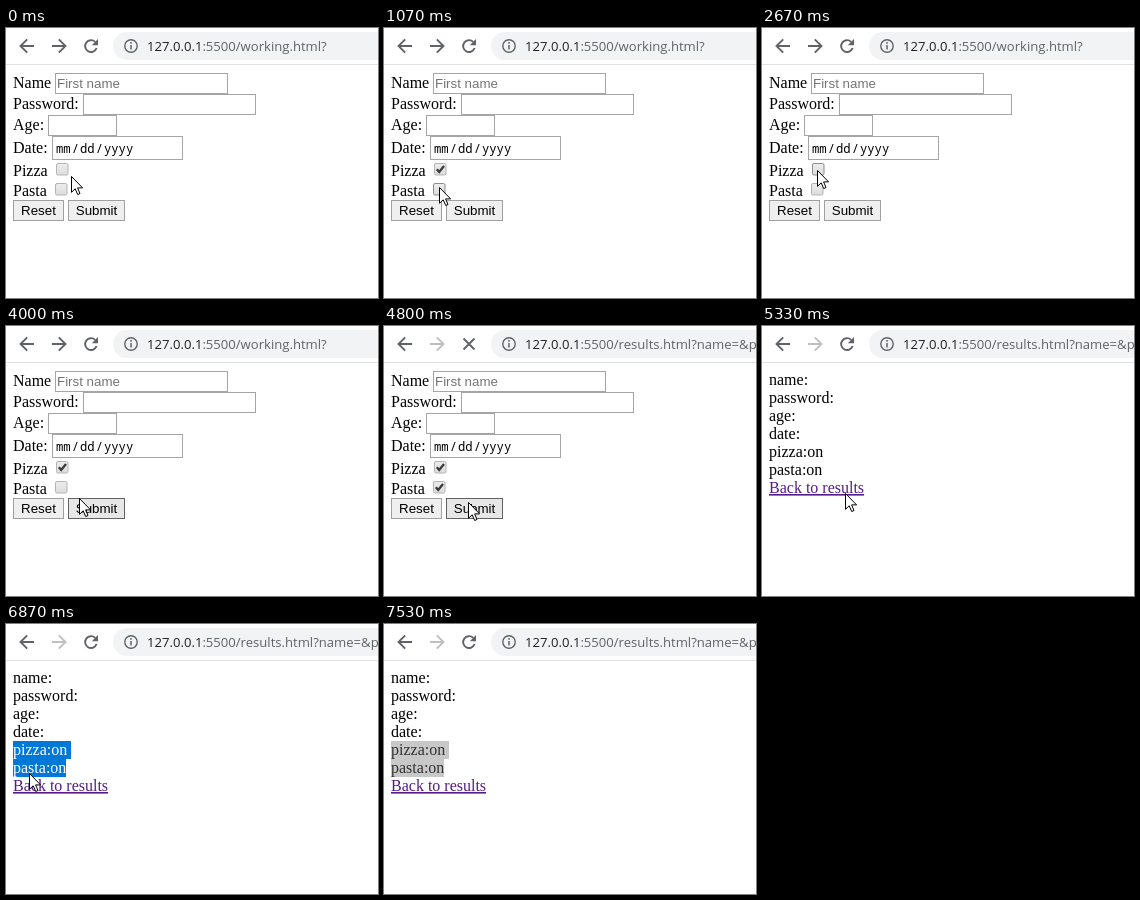
Recreate the animation shown at these times as an HTML page. Size 372x270 px, loop 7670 ms.

```html
<!DOCTYPE html>
<html lang="en">
<head>
<meta charset="utf-8">
<title>Form checkboxes</title>
<style>
html, body { margin: 0; width: 100%; height: 100%; overflow: hidden; background: #fff; }
svg { display: block; width: 372px; height: 270px; }
text { white-space: pre; }
.page { font: 16px "Liberation Serif", serif; }
.ui { font: 13.333px "Liberation Sans", sans-serif; }
.date { font: 12.2px "Noto Sans Mono", monospace; }
.url { font: 13.1px "Open Sans", sans-serif; }
.icon { fill: none; stroke: #5f6368; stroke-width: 1.9; }
.field { fill: #fff; stroke: #a5a5a5; }
.button { fill: #efefef; stroke: #a0a0a0; }
.button.hover { fill: #e7e7e7; stroke: #636363; }
.box { fill: url(#shade); stroke: #b4b4b4; }
.hover .box { stroke: #8c8c8c; }
.pressed .box { fill: #cfcfcf; stroke: #7c7c7c; }
.tick { fill: none; stroke: #3a3a3a; stroke-width: 2.3; }
</style>
</head>
<body>
<svg viewBox="0 0 372 270">
  <defs>
    <linearGradient id="shade" x2="0" y2="1">
      <stop stop-color="#ededed"/><stop offset="1" stop-color="#dcdcdc"/>
    </linearGradient>
    <clipPath id="range">
      <rect id="pizzaRange" y="117" height="18"/>
      <rect id="pastaRange" y="135" height="18"/>
    </clipPath>
  </defs>

  <!-- Toolbar -->
  <path d="M0 36.5H372" stroke="#dfe0e2"/>
  <path class="icon" d="M28 18H15.5M21.2 11.3L14.5 18l6.7 6.7"/>
  <path class="icon" id="forward" d="M46 18H58.5M52.8 11.3L59.5 18l-6.7 6.7"/>
  <g id="reload">
    <path class="icon" d="M90.6 20A5.9 5.9 0 1 1 89.2 13.9"/>
    <path d="M92 11v6.2h-6.2z" fill="#5f6368"/>
  </g>
  <path class="icon" id="stop" d="M79.5 12.5l11 11m0-11l-11 11"/>
  <rect x="107" y="4" width="300" height="28" rx="14" fill="#f1f3f4"/>
  <circle class="icon" cx="125" cy="18" r="6.2" style="stroke-width:1.4"/>
  <path class="icon" d="M125 17v4.5M125 14v1.7" style="stroke-width:1.5"/>
  <text class="url" x="141" y="23" fill="#5f6368"><tspan fill="#202124">127.0.0.1</tspan><tspan id="path"></tspan></text>

  <!-- Form page -->
  <g id="form">
    <g class="page">
      <text x="7" y="60">Name</text>
      <text x="7" y="81">Password:</text>
      <text x="7" y="102">Age:</text>
      <text x="7" y="125">Date:</text>
      <text x="7" y="148">Pizza</text>
      <text x="7" y="168">Pasta</text>
    </g>
    <g class="field">
      <rect x="49.5" y="45.5" width="172" height="20"/>
      <rect x="77.5" y="66.5" width="172" height="20"/>
      <rect x="42.5" y="87.5" width="68" height="20"/>
      <rect x="46.5" y="108.5" width="130" height="23"/>
    </g>
    <text class="ui" x="51" y="60" fill="#757575">First name</text>
    <text class="date" y="125"><tspan x="50">mm</tspan><tspan x="65.7">/</tspan><tspan x="74">dd</tspan><tspan x="89.7">/</tspan><tspan x="98">yyyy</tspan></text>
    <g id="pizza" transform="translate(50 135)">
      <rect class="box" x=".5" y=".5" width="11.5" height="11.5" rx="1.5"/>
      <path class="tick" d="M2.8 6.3L5.2 8.9 10 3"/>
    </g>
    <g id="pasta" transform="translate(49 155)">
      <rect class="box" x=".5" y=".5" width="11.5" height="11.5" rx="1.5"/>
      <path class="tick" d="M2.8 6.3L5.2 8.9 10 3"/>
    </g>
    <rect class="button" x="7.5" y="172.5" width="50" height="20"/>
    <rect class="button" id="submit" x="62.5" y="172.5" width="56" height="20"/>
    <g class="ui" text-anchor="middle">
      <text x="32.5" y="187">Reset</text>
      <text x="90.5" y="187">Submit</text>
    </g>
  </g>

  <!-- Results page -->
  <g id="results" class="page">
    <text x="7" y="59">name:</text>
    <text x="7" y="77">password:</text>
    <text x="7" y="95">age:</text>
    <text x="7" y="113">date:</text>
    <text x="7" y="131">pizza:on</text>
    <text x="7" y="149">pasta:on</text>
    <text x="7" y="167" fill="#551a8b" text-decoration="underline">Back to results</text>
    <g id="selection" clip-path="url(#range)">
      <rect id="highlight" x="7" y="117" width="58" height="36"/>
      <text x="7" y="131">pizza:on</text>
      <text x="7" y="149">pasta:on</text>
    </g>
  </g>

  <path id="arrow" d="M.5.5V16.3L4.2 12.8 6.7 18.5 9 17.5 6.6 11.9H11.6Z" fill="#fff" stroke="#000"/>
  <path id="beam" d="M-3 -8.5H-.8L0 -8 .8 -8.5H3M0 -8V8M-3 8.5H-.8L0 8 .8 8.5H3" fill="none" stroke="#000"/>
</svg>
<script>
const LOOP = 7670, RATE = 15 / 1000;
const $ = id => document.getElementById(id);

// Pointer track: step, x, y
const track = [
  [0, 65, 148], [2, 62, 148], [3, 62, 148], [4, 58, 145], [6, 58, 145], [8, 57, 138],
  [12, 57, 138], [16, 55, 159], [25, 55, 159], [29, 55, 138], [33, 55, 138],
  [36, 56, 155], [38, 56, 155], [40, 55, 142], [44, 55, 142], [47, 55, 153],
  [50, 55, 153], [57, 83, 180], [59, 83, 180], [60, 73, 172], [63, 54, 161],
  [67, 54, 161], [71, 84, 176], [78, 84, 176], [84, 82, 150], [88, 80, 140],
  [89, 79, 138], [90, 60, 140], [96, 4, 130], [102, 4, 130], [109, 134, 262], [110, 150, 290]
];
// Steps at which each box is toggled; the press shows shortly before
const toggles = { pizza: [11, 32, 44], pasta: [22, 38, 67] };
const boxes = { pizza: [50, 135], pasta: [49, 155] };

function pointer(step) {
  const i = track.findIndex(k => k[0] > step);
  if (i < 0) return track[track.length - 1].slice(1);
  const [s0, x0, y0] = track[i - 1], [s1, x1, y1] = track[i];
  const p = (step - s0) / (s1 - s0);
  return [Math.round(x0 + (x1 - x0) * p), Math.round(y0 + (y1 - y0) * p)];
}

const show = (id, on) => $(id).style.display = on ? "" : "none";
const inside = (x, y, left, top, w, h) => x >= left && x < left + w && y >= top && y < top + h;

function setRange(id, left, right) {
  $(id).setAttribute("x", left);
  $(id).setAttribute("width", Math.max(0, right - left));
}

function drawBox(id, step, x, y) {
  const hits = toggles[id], box = $(id);
  const checked = hits.filter(s => s <= step).length % 2 === 1;
  box.querySelector(".tick").style.display = checked ? "" : "none";
  box.classList.toggle("hover", inside(x, y, ...boxes[id], 13, 13));
  box.classList.toggle("pressed", hits.some(s => step === s - 1));
}

function drawSelection(step, x, y) {
  show("selection", step > 90);
  const upper = step >= 96 || y < 135;
  const left = step >= 96 ? 7 : Math.max(7, x);
  setRange("pizzaRange", upper ? left : 65, 65);
  setRange("pastaRange", upper ? 7 : left, 60);
  const active = step < 113;
  $("highlight").setAttribute("fill", active ? "#0078d7" : "#c8c8c8");
  $("selection").setAttribute("fill", active ? "#fff" : "#323232");
}

function draw(time) {
  const step = Math.floor((time % LOOP + 5) * RATE);
  const [x, y] = pointer(step);
  const sent = step >= 72, loaded = step >= 75;

  show("form", !loaded);
  show("results", loaded);
  show("stop", sent && !loaded);
  show("reload", !sent || loaded);
  $("forward").style.stroke = sent ? "#bdbfc1" : "";
  $("path").textContent = sent
    ? ":5500/results.html?name=&password=&age=&date="
    : ":5500/working.html?";

  drawBox("pizza", step, x, y);
  drawBox("pasta", step, x, y);
  $("submit").classList.toggle("hover", inside(x, y, 62, 172, 57, 21));
  drawSelection(step, x, y);

  const dragging = step >= 90 && step < 96;
  show("beam", dragging);
  show("arrow", !dragging);
  $(dragging ? "beam" : "arrow").setAttribute("transform", `translate(${x} ${y})`);
}

const start = performance.now();
function tick() {
  draw(performance.now() - start);
  requestAnimationFrame(tick);
}
tick();
</script>
</body>
</html>
```
